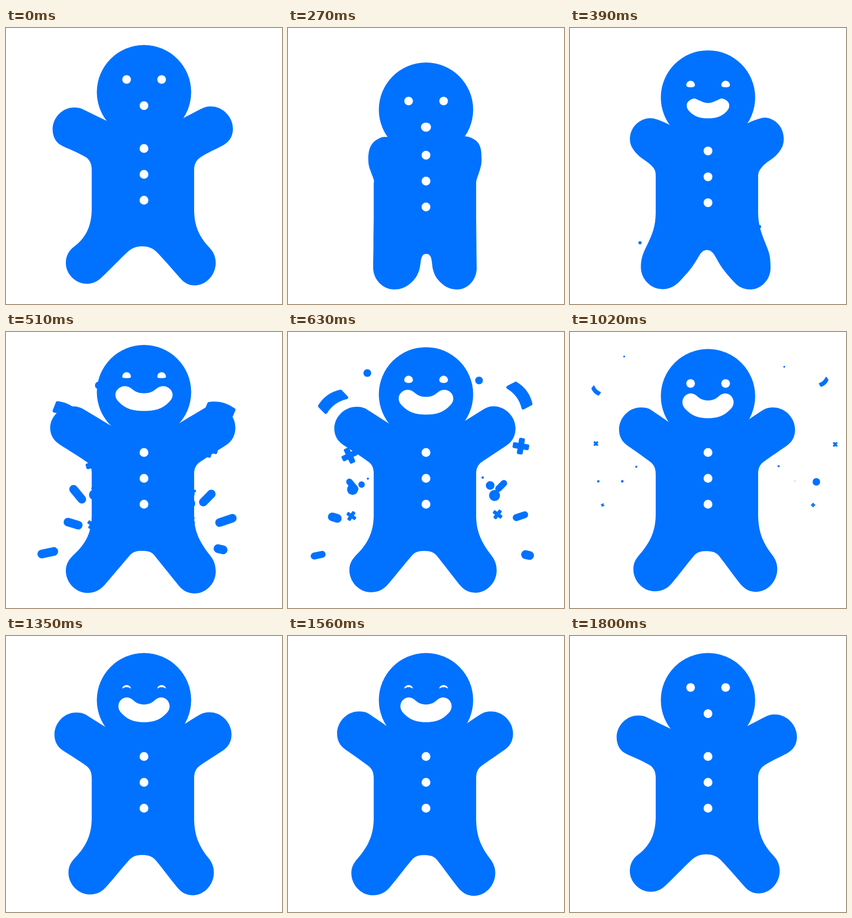
Recreate the animation shown at these times as an HTML page with a canvas. Size 512 by 512 pixels, loop 1830 ms.

```html
<!DOCTYPE html>
<html lang="en">
<head>
<meta charset="utf-8">
<title>Gingerbread jump</title>
<style>
html, body { margin: 0; width: 100%; height: 100%; overflow: hidden; background: #fff; }
canvas { display: block; width: 100vw; height: 100vh; }
</style>
</head>
<body>
<canvas id="stage"></canvas>
<script>
const LOOP = 1830, STEP = 30, SIZE = 512;
const BLUE = '#0072ff', WHITE = '#fff';
const canvas = document.getElementById('stage');
const ctx = canvas.getContext('2d');
const ratio = window.devicePixelRatio || 1;
canvas.width = canvas.height = SIZE * ratio;

// Body outlines: x, y and heading in degrees, from the left of the neck round to the right.
const REST = [
  [215, 186, 206], [143, 151, 206], [126, 147.5, 180], [86.5, 188, 90], [105, 219, 25],
  [147, 239, 30], [159, 263, 90], [159, 335, 90], [127, 405, 143], [111, 436, 90],
  [150, 474.5, 0], [177, 463, -43], [225, 416, -43], [252, 405, 0], [280, 416, 46],
  [324, 465, 48], [350, 477.5, 0], [389, 436, -90], [377, 407, -133], [349, 337, -90],
  [349, 263, -90], [362, 239, -32], [402, 218, -28], [421, 187, -90], [380, 145.5, -180],
  [362, 150, -207], [300, 182, -207]
];
const SQUAT = [
  [215, 203, 180], [180, 202, 180], [165, 207, 150], [149, 243, 90], [152, 262, 71],
  [159, 281, 71], [159, 290, 90], [159, 345, 90], [158.5, 400, 90], [158, 445, 90],
  [197, 485, 0], [230, 471, -44], [244, 447, -74], [256.5, 419, 0], [269, 448, 76],
  [283, 472, 44], [314, 485, 0], [350, 446, -90], [349.5, 400, -90], [349, 345, -90],
  [349, 290, -90], [350, 281, -72], [356, 263, -72], [359, 243, -90], [346, 207, -148],
  [328, 201, -178], [300, 201, -180]
];
const JUMP = [
  [215, 186, 211], [145, 144, 211], [124, 138, 180], [82, 178, 90], [100, 209, 33],
  [151, 242, 36], [159, 263, 90], [159, 340, 90], [128, 411, 137], [111, 443, 90],
  [151, 484, 0], [184, 468, -49], [230, 414, -49], [252, 406, 0], [275, 414, 51],
  [320, 470, 51], [350, 485, 0], [389, 445, -90], [379, 415, -128], [349, 341, -90],
  [349, 263, -90], [360, 241, -34], [408, 210, -33], [425.5, 177, -90], [384, 136, -180],
  [362, 145, -210], [300, 182, -210]
];
const CHEER = [
  [215, 189, 214], [151, 145, 214], [131, 140, 180], [91, 181, 90], [107, 211, 35],
  [149, 241, 37], [159, 264, 90], [159, 338, 90], [129, 413, 131], [117.5, 440, 90],
  [157, 481, 0], [189, 466, -50], [230, 415, -50], [253, 406.5, 0], [277, 416, 52],
  [314, 465, 52], [345, 482, 0], [384.5, 440, -90], [374, 412, -127], [349, 338, -90],
  [349, 264, -90], [359, 241, -36], [402, 211, -35], [417.5, 181, -90], [377, 140, -180],
  [356, 146, -213], [300, 183, -213]
];

const SMILE = [
  [208.5, 130, 90], [214, 143, 47], [256, 160, 0], [298, 143, -47], [303.5, 130, -90],
  [288, 114, -180], [275, 120, -220], [256, 127, -180], [237, 120, -140], [224, 114, -180]
];
const DOT = [90, 45, 0, -45, -90, -120, -150, -180, -210, -240].map(a => {
  const r = a * Math.PI / 180;
  return [256 - 8 * Math.sin(r), 144 + 8 * Math.cos(r), a];
});

// Eye shape: top, corner height, bottom, lower handle drop, lower handle inset.
const OPEN = [-8, 0, 8, 4.4, 0];
const SQUINT = [-7.5, 1, 3.5, 2.5, 0];
const SHUT = [-4.5, 2.2, -0.5, -1.5, 2];

const mix = (a, b, k) => Array.isArray(a) ? a.map((v, i) => mix(v, b[i], k)) : a + (b - a) * k;
const ease = k => k < 0.5 ? 2 * k * k : 1 - 2 * (1 - k) * (1 - k);

function at(keys, t) {
  if (t <= keys[0][0]) return keys[0][1];
  for (let i = 1; i < keys.length; i++) {
    const [t0, a] = keys[i - 1], [t1, b] = keys[i];
    if (t <= t1) return mix(a, b, ease((t - t0) / (t1 - t0)));
  }
  return keys[keys.length - 1][1];
}

const bodyKeys = [
  [0, REST], [240, SQUAT], [270, SQUAT], [495, JUMP], [525, JUMP], [750, CHEER], [1140, CHEER],
  [1350, mix(CHEER, REST, 0.25)], [1560, CHEER], [1620, CHEER], [1800, REST]
];
const headKeys = [[0, 0], [240, 32.5], [270, 32.5], [495, -7.5], [525, -7.5], [750, 2], [780, 2], [930, 0]];
const faceKeys = [[0, 0], [240, 40], [270, 40], [495, -13.5], [525, -13.5], [750, 2], [780, 2], [930, 0]];
const buttonKeys = [[0, 0], [240, 12.5], [270, 12.5], [480, 0]];
const mouthKeys = [[240, DOT], [480, SMILE], [1620, SMILE], [1800, DOT]];
const grinKeys = [[240, 1], [480, 1.116], [525, 1.116], [750, 1]];
const eyeKeys = [
  [240, OPEN], [480, SQUINT], [540, SQUINT], [720, OPEN],
  [1170, OPEN], [1320, SHUT], [1620, SHUT], [1800, OPEN]
];

// Confetti: x, y, size (and turn) at three moments.
const MOMENTS = [510, 780, 1020];
const dots = [
  [[172, 99, 7], [123, 56.5, 7.5], [100.5, 45.5, 1.7]],
  [[330, 108, 7], [377.5, 74, 7.5], [397.5, 64.5, 1.7]],
  [[164, 302, 10], [80, 283, 10.5], [52.5, 277, 2.3]],
  [[167, 296, 6], [110.5, 274, 6], [97, 277, 2.4]],
  [[160, 290, 2], [136, 257, 2], [123, 250, 2]],
  [[341, 318, 10], [423, 289.5, 10.5], [457, 278, 7]],
  [[342, 300, 8], [403, 274, 8], [417, 276.5, 0.7]],
  [[350, 295, 2.5], [373, 251, 2], [387, 249, 2]]
];
const crosses = [
  [[163, 246, 30, -15], [72, 215, 30, -18], [48, 207, 10, 45]],
  [[378, 218, 30, 15], [476, 207.5, 31, 13], [492, 208.5, 10, 45]],
  [[160, 357, 19, 35], [81, 328, 19, 32], [60.5, 321, 6.5, 25]],
  [[342, 350, 19, 40], [429, 328, 19, 28], [451, 321, 8, 0]]
];
const ribbons = [
  [[114, 149, 1, 120], [57, 111.5, 1, -4], [48, 109, 0.36, -45]],
  [[397, 144, 1, 76], [459, 96, 1, -4], [471, 93, 0.36, -47]]
];
// Streaks: x, y mid-flight, x, y at the end, length, end radius.
const streaks = [
  [133, 301, 116.5, 281, 40, 3], [124.5, 355.5, 79, 342, 36, 8], [77.5, 409.5, 51.5, 415, 39, 4],
  [373.5, 308, 400, 281, 37, 3], [408, 349.5, 436, 340, 41, 4], [398, 403, 454, 416, 26, 8.5]
];

// Smooth curve through three moments.
function flight([a, b, c], i, t) {
  const [p, q, r] = MOMENTS;
  return a[i] * (t - q) * (t - r) / ((p - q) * (p - r))
    + b[i] * (t - p) * (t - r) / ((q - p) * (q - r))
    + c[i] * (t - p) * (t - q) / ((r - p) * (r - q));
}

const sizeAt = (p, t) => at([[420, 0], [510, p[0][2]], [780, p[1][2]], [1020, p[2][2]], [1110, 0]], t);

function disc(x, y, r) {
  ctx.beginPath();
  ctx.arc(x, y, r, 0, Math.PI * 2);
  ctx.fill();
}

function outline(points) {
  ctx.beginPath();
  ctx.moveTo(points[0][0], points[0][1]);
  points.forEach(([x, y, a], i) => {
    const [u, v, b] = points[(i + 1) % points.length];
    const h = Math.hypot(u - x, v - y) * 0.38, k = Math.PI / 180;
    if (i === points.length - 1 && points.length > 20) ctx.lineTo(u, v);
    else ctx.bezierCurveTo(x + h * Math.cos(a * k), y + h * Math.sin(a * k),
      u - h * Math.cos(b * k), v - h * Math.sin(b * k), u, v);
  });
  ctx.fill();
}

function placed(x, y, turn, flip, scale, draw) {
  ctx.save();
  ctx.translate(x, y);
  ctx.scale(flip * scale, scale);
  ctx.rotate(turn * Math.PI / 180);
  draw();
  ctx.restore();
}

function cross(len) {
  const w = len * 0.36, r = len * 0.09;
  ctx.beginPath();
  ctx.roundRect(-len / 2, -w / 2, len, w, r);
  ctx.roundRect(-w / 2, -len / 2, w, len, r);
  ctx.fill();
}

function ribbon() {
  ctx.beginPath();
  ctx.moveTo(-6, -22.5);
  ctx.quadraticCurveTo(-16, 1, -6, 25);
  ctx.lineTo(10, 22.5);
  ctx.quadraticCurveTo(0, -1, 10, -25);
  ctx.closePath();
  ctx.lineWidth = 6;
  ctx.lineJoin = 'round';
  ctx.fill();
  ctx.stroke();
}

function streak([mx, my, ex, ey, len, r], t) {
  const gone = 780 + r * 12;
  if (t < 390 || t >= gone) return;
  const left = u => (1 - u) ** 3;
  const u = Math.min(1, (t - 390) / 390);
  const k = left(u) / left(120 / 390);
  const x = ex + (mx - ex) * k, y = ey + (my - ey) * k;
  const a = Math.atan2(ey - my, ex - mx);
  const radius = at([[390, 3], [510, 8], [780, r], [gone, 0]], t);
  const total = at([[390, 0], [500, len], [540, len], [780, r > 8 ? 19 : 0]], t);
  const half = Math.max(0.01, total / 2 - radius);
  ctx.lineWidth = radius * 2;
  ctx.lineCap = 'round';
  ctx.beginPath();
  ctx.moveTo(x - half * Math.cos(a), y - half * Math.sin(a));
  ctx.lineTo(x + half * Math.cos(a), y + half * Math.sin(a));
  ctx.stroke();
}

function confetti(t) {
  if (t < 390 || t >= 1110) return;
  streaks.forEach(s => streak(s, t));
  if (t <= 420) return;
  dots.forEach(p => disc(flight(p, 0, t), flight(p, 1, t), sizeAt(p, t)));
  crosses.forEach(p => placed(flight(p, 0, t), flight(p, 1, t), flight(p, 3, t), 1, 1,
    () => cross(sizeAt(p, t))));
  ribbons.forEach((p, i) => placed(flight(p, 0, t), flight(p, 1, t), flight(p, 3, t),
    i ? -1 : 1, sizeAt(p, t), ribbon));
}

function eye(x, y, [top, side, low, drop, inset]) {
  const rise = side + (top - side) * 0.55;
  ctx.beginPath();
  ctx.moveTo(x - 8, y + side);
  ctx.bezierCurveTo(x - 8, y + rise, x - 4.4, y + top, x, y + top);
  ctx.bezierCurveTo(x + 4.4, y + top, x + 8, y + rise, x + 8, y + side);
  ctx.bezierCurveTo(x + 8 - inset, y + side + drop, x + 4.4, y + low, x, y + low);
  ctx.bezierCurveTo(x - 4.4, y + low, x - 8 + inset, y + side + drop, x - 8, y + side);
  ctx.fill();
}

function render(t) {
  ctx.setTransform(ratio, 0, 0, ratio, 0, 0);
  ctx.fillStyle = WHITE;
  ctx.fillRect(0, 0, SIZE, SIZE);

  ctx.fillStyle = ctx.strokeStyle = BLUE;
  confetti(t);
  outline(at(bodyKeys, t));
  disc(256, 119 + at(headKeys, t), 87.5);

  ctx.fillStyle = WHITE;
  const face = at(faceKeys, t), grin = at(grinKeys, t), lids = at(eyeKeys, t);
  eye(223.7, 95.5 + face, lids);
  eye(288.7, 95.5 + face, lids);
  outline(at(mouthKeys, t).map(([x, y, a]) => [256 + (x - 256) * grin, y + face, a]));
  for (let i = 0; i < 3; i++) disc(256, 223.5 + 48 * i + at(buttonKeys, t), 8.2);
}

const start = performance.now();
function tick() {
  const t = (performance.now() - start) % LOOP;
  render(Math.floor(t / STEP) * STEP);
  requestAnimationFrame(tick);
}
tick();
</script>
</body>
</html>
```
